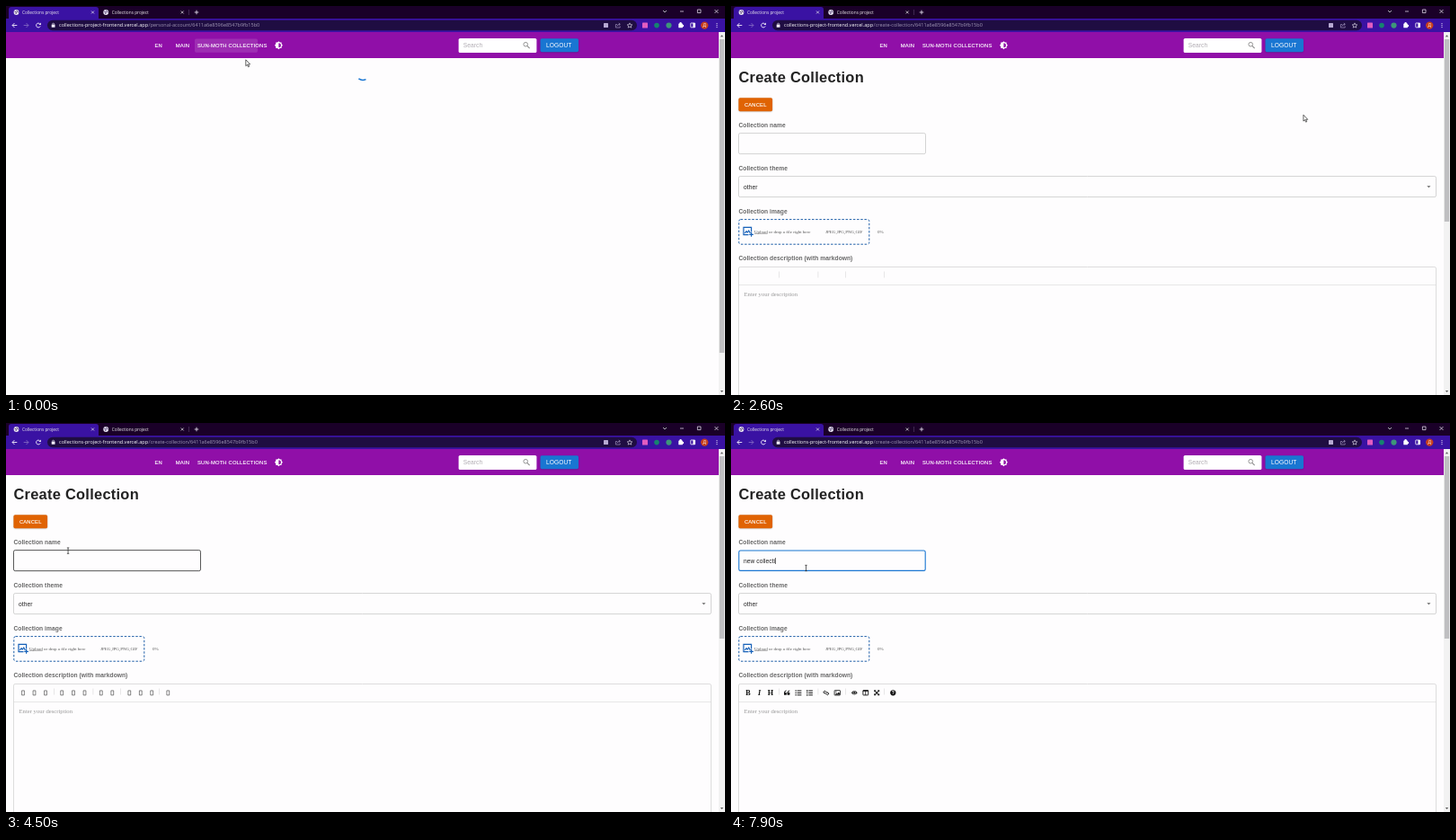
An HTML page with a canvas that plays this animation: 800 by 433 pixels, repeating every 8 s.

```html
<!DOCTYPE html>
<html lang="en">
<head>
<meta charset="utf-8">
<title>Collections project</title>
<style>
html, body { margin: 0; width: 100%; height: 100%; overflow: hidden; background: #fefdfe; }
canvas { display: block; width: 800px; height: 433px; }
</style>
</head>
<body>
<canvas id="stage"></canvas>
<script>
const LOOP = 8000, STEP = 100;
const LOADED = 400, FORM_OPEN = 2400, BOXES = 3200, ICONS = 4600, FOCUS = 4900;
const SANS = '"Liberation Sans", Arial, sans-serif';
const SERIF = '"Liberation Serif", "Times New Roman", serif';
const UI = '"Open Sans", "Noto Sans", sans-serif';
const BLUE = '#1976d2', PURPLE = '#900fa8', BAR = '#3a12a3', INK = '#222';
const USER = 'sun-moth';

// [time, tip x, tip y]
const PATH = [
  [0, 266.5, 59.5], [700, 274, 87], [900, 250, 108], [1200, 73, 131], [1300, 73, 131],
  [1800, 744, 92], [1900, 747.5, 78.2], [2400, 747.5, 78.2], [2900, 432.5, 199.5],
  [3000, 432.5, 199.5], [3600, 42.5, 106.5], [4200, 42.5, 106.5], [4700, 83.5, 161.5]
];
// [time, characters typed]
const TYPING = [[5400, 1], [5500, 2], [5700, 3], [6600, 4], [6800, 5], [6900, 6],
  [7000, 7], [7200, 9], [7600, 10], [7900, 12]];

const canvas = document.getElementById('stage');
const c = canvas.getContext('2d');
const ratio = window.devicePixelRatio || 1;
canvas.width = 800 * ratio;
canvas.height = 433 * ratio;

function box(x, y, w, h, fill, r = 0) {
  c.fillStyle = fill;
  c.beginPath();
  c.roundRect(x, y, w, h, r);
  c.fill();
}
function frame(x, y, w, h, color, width = 0.75, r = 1.7) {
  c.strokeStyle = color;
  c.lineWidth = width;
  c.beginPath();
  c.roundRect(x, y, w, h, r);
  c.stroke();
}
function disc(x, y, r, fill) {
  c.fillStyle = fill;
  c.beginPath();
  c.arc(x, y, r, 0, 7);
  c.fill();
}
function ring(x, y, r, color, width = 0.8, from = 0, to = 2 * Math.PI) {
  c.strokeStyle = color;
  c.lineWidth = width;
  c.beginPath();
  c.arc(x, y, r, from, to);
  c.stroke();
}
// SVG path data drawn with its origin at x, y
function shape(x, y, d, { fill, stroke, width = 0.8 }) {
  const path = new Path2D(d);
  c.save();
  c.translate(x, y);
  if (fill) { c.fillStyle = fill; c.fill(path); }
  if (stroke) { c.strokeStyle = stroke; c.lineWidth = width; c.stroke(path); }
  c.restore();
}
const line = (x, y, d, stroke, width) => shape(x, y, d, { stroke, width });

// y is the middle of the capitals; spacing is in em; weight thickens the strokes
function text(str, x, y, { size = 6.667, color = INK, family = SANS, style = '', spacing = 0.00938, align = 'left', weight = 0 } = {}) {
  c.font = `${style} ${size}px ${family}`;
  c.letterSpacing = spacing * size + 'px';
  c.textAlign = align;
  c.fillStyle = c.strokeStyle = color;
  c.fillText(str, x, y + size * 0.358);
  if (weight) {
    c.lineWidth = weight;
    c.strokeText(str, x, y + size * 0.358);
  }
}
function button(x, y, w, h, fill) {
  c.save();
  c.shadowColor = 'rgba(0,0,0,.25)';
  c.shadowBlur = 1.6 * ratio;
  c.shadowOffsetY = 0.6 * ratio;
  box(x, y, w, h, fill, 1.7);
  c.restore();
}
function magnifier(x, y, color) {
  ring(x, y, 2.3, color, 0.9);
  line(x, y, 'M1.7 1.7L4.4 4.4', color, 1.1);
}
const dropArrow = (x, y) => shape(x, y, 'M-2.1-1H2.1L0 1.1Z', { fill: '#666' });

function tab(x) {
  disc(x + 8.5, 7, 2.9, '#e8e4f2');
  line(x + 8.5, 7, 'M-2-1L0 0L-.6 2M.4-2.4L1 -.6L2.4 0', '#3b2560', 0.8);
  text('Collections project', x + 15, 7, { size: 4.77, color: '#eee', family: UI, spacing: 0 });
  line(x + 93.5, 7, 'M-1.5-1.5L1.5 1.5M1.5-1.5L-1.5 1.5', '#eee', 0.7);
}

function browser(formOpen) {
  const white = '#f2eefa', grey = '#b7a9d2';
  box(0, 0, 800, 14, '#1a0028');
  box(0, 14, 800, 15, BAR);
  box(3, 1, 100, 14, BAR, [3, 3, 0, 0]);
  tab(3);
  tab(102.7);
  box(203, 4, 0.5, 6, '#64517a');
  line(212, 7, 'M-2.3 0H2.3M0-2.3V2.3', white, 0.8);
  line(733, 6, 'M-2-1L0 1L2-1', white, 0.7);
  line(752, 6, 'M-2 0H2', white, 0.7);
  frame(769.4, 4, 3.6, 3.6, white, 0.7, 0);
  line(790.5, 6, 'M-2-2L2 2M2-2L-2 2', white, 0.7);

  line(9.5, 21.5, 'M2.8 0H-2.5M0-2.5L-2.5 0L0 2.5', white, 0.9);
  line(22.5, 21.5, 'M-2.8 0H2.5M0-2.5L2.5 0L0 2.5', '#8066c2', 0.9);
  ring(36, 21.5, 2.4, white, 0.9, 0.4, 5.4);
  shape(36, 21.5, 'M.4-.4H2.9V-2.9Z', { fill: white });
  box(46, 15.7, 656, 11.6, '#1f0d42', 5.8);
  box(50.7, 20.6, 3.8, 3.2, white, 0.4);
  ring(52.6, 20.4, 1.2, white, 0.6, Math.PI, 0);
  const url = { size: 5.53, family: UI, spacing: 0 };
  text('collections-project-frontend.vercel.app', 59, 21.5, { ...url, color: '#fff' });
  text((formOpen ? '/create-collection/' : '/personal-account/') + '6411a6e8596e8547b9fb15b0',
    158.6, 21.5, { ...url, color: '#a096b4' });

  box(665, 19, 5, 5, grey, 0.6);
  line(681, 21.5, 'M-1-1H-2.6V2.5H2.2V1M-1 1Q-.8-1.2 2-1.2M.8-2.6L2.4-1.2L.8 .2', grey, 0.6);
  line(694, 21.7, 'M0-2.8L.8-.9L2.8-.8L1.3 .5L1.8 2.4L0 1.4L-1.8 2.4L-1.3 .5L-2.8-.8L-.8-.9Z', white, 0.6);
  box(708, 18.6, 6, 6, '#e25cc0', 0.6);
  disc(724, 21.6, 2.8, '#16836f');
  disc(737.5, 21.6, 3.1, '#3e9679');
  box(748.3, 19.6, 4.6, 4.6, '#fff', 0.5);
  disc(750.6, 19.3, 1.2, '#fff');
  disc(753, 22, 1.2, '#fff');
  frame(761.8, 19, 4.8, 4.8, '#fff', 0.8, 0.4);
  box(764.4, 19, 2.4, 4.8, '#fff');
  disc(777.2, 21.6, 4.2, '#c8401c');
  text('Д', 777.2, 21.5, { size: 5, color: '#fff', family: UI, spacing: 0, align: 'center' });
  for (const dy of [-2, 0, 2]) disc(791, 21.6 + dy, 0.6, white);
}

function scrollbar(thumbEnd) {
  box(793, 29, 7, 404, '#f2f2f2');
  box(793.8, 37, 5.4, thumbEnd - 37, '#bfbfc1');
  shape(796.5, 33.3, 'M-1.6 .9H1.6L0-1Z', { fill: '#555' });
  shape(796.5, 429, 'M-1.6-.9H1.6L0 1Z', { fill: '#555' });
}

function header(t) {
  box(0, 29, 793, 29, PURPLE);
  if (t < 300) box(210, 36.5, 70, 15.2, `rgba(255,255,255,${0.13 * (1 - t / 300)})`, 1.7);
  const nav = { size: 5.833, color: '#fff', spacing: 0.02857, weight: 0.15 };
  text('EN', 165.5, 43.8, nav);
  text('MAIN', 188.8, 43.8, nav);
  text(USER.toUpperCase() + ' COLLECTIONS', 213, 43.8, nav);

  c.save();
  c.translate(303.4, 43.7);
  for (let i = 0; i < 2; i++) {
    box(-3.2, -3.2, 6.4, 6.4, '#fff');
    c.rotate(Math.PI / 4);
  }
  c.restore();
  shape(303.4, 43.7, 'M0-2.5A2.5 2.5 0 0 1 0 2.5Z', { fill: PURPLE });

  box(503.6, 35.9, 86.8, 16.2, '#fff', 1.7);
  text('Search', 508.8, 43.6, { color: '#b0abb2' });
  magnifier(578.2, 42.7, '#8a8a8a');
  button(594.5, 36.3, 42.5, 14.9, BLUE);
  text('LOGOUT', 601, 43.6, { color: '#fff' });
}

function spinner(t) {
  const phase = ((t + 210) % 1400) / 1400;
  const ease = u => u * u * (3 - 2 * u);
  const grow = ease(Math.min(1, phase * 2)), leave = ease(Math.max(0, phase * 2 - 1));
  const turn = 2 * Math.PI, full = 126.9;
  const offset = 15 * grow + 110 * leave;
  const start = turn * (phase + offset / full);
  const length = Math.min(1 + 99 * grow, full - offset) / full * turn;
  ring(397, 74.7, 7.7, BLUE, 1.5, start, start + length);
}

function listPage(hover) {
  text(USER + ' collections', 8.4, 76.2, { size: 12.5, style: 'bold', spacing: 0.0075 });
  button(699, 68.3, 85.7, 15.1, hover ? '#1769c1' : BLUE);
  text('CREATE COLLECTION', 705.9, 75.6, { color: '#fff' });
  frame(8.6, 96.1, 92.6, 16.2, '#c6c6c6');
  text('Search', 14, 104.3, { color: '#777' });
  frame(107.6, 96.1, 86, 16.2, '#c6c6c6');
  text('Creation (descending)', 113.3, 104.2);
  dropArrow(185.8, 104.3);
  text('No collections yet', 8.4, 131.8);
}

const TOOL_X = [19, 31.5, 44, 62.2, 75, 87.5, 105.8, 118.3, 137.3, 149.8, 162.2, 180.3];
const letter = (char, style) => x => text(char, x, 300.3, { size: 8.2, style, family: SERIF, color: '#111', spacing: 0, align: 'center' });
const list = x => {
  for (const dy of [-2.4, 0, 2.4]) {
    box(x - 1.4, 299.9 + dy, 4.8, 1, '#111');
    disc(x - 2.9, 300.4 + dy, 0.7, '#111');
  }
};
const TOOLS = [
  letter('B', 'bold'), letter('I', 'italic bold'), letter('H', 'bold'),
  x => [-1.8, 1.8].forEach(dx => {
    box(x + dx - 1.4, 300, 2.8, 2.8, '#111', 0.6);
    line(x + dx, 300, 'M-1 .8Q-1.1-2 1.2-2', '#111', 1);
  }),
  list,
  x => {
    for (const dy of [-2.4, 0, 2.4]) {
      box(x - 1.2, 299.9 + dy, 4.6, 1, '#111');
      box(x - 3.2, 299.5 + dy, 1, 1.8, '#111');
    }
  },
  x => line(x, 300.3, 'M-.6 .6L-2.3 .4A1.2 1.2 0 0 1-.6-1.6L.8 0M.6-.6L2.3 0A1.2 1.2 0 0 1 .8 2L-.5 .6', '#111', 1),
  x => {
    frame(x - 3.2, 297.6, 6.4, 5.4, '#111', 0.8, 0.5);
    shape(x, 300.4, 'M-2.6 2L-1 .2L0 1L1.4-1L2.6 .6V2Z', { fill: '#111' });
    disc(x - 1.4, 299.1, 0.7, '#111');
  },
  x => {
    shape(x, 300.3, 'M-3.4 0Q0-4.6 3.4 0Q0 4.6-3.4 0Z', { fill: '#111' });
    ring(x, 300.3, 1.5, '#fff', 0.6);
  },
  x => {
    frame(x - 2.9, 297.7, 5.8, 5.2, '#111', 0.9, 0.4);
    box(x - 0.4, 297.7, 0.8, 5.2, '#111');
    box(x - 3, 297.4, 6, 1.3, '#111');
  },
  x => {
    line(x, 300.3, 'M-2 -2L2 2M2-2L-2 2', '#111', 1.1);
    shape(x, 300.3, 'M-3-3H-.7L-3-.7ZM3-3V-.7L.7-3ZM3 3H.7L3 .7ZM-3 3V.7L-.7 3Z', { fill: '#111' });
  },
  x => {
    disc(x, 300.3, 3.1, '#111');
    text('?', x, 300.3, { size: 5, style: 'bold', color: '#fff', spacing: 0, align: 'center' });
  }
];

function nameField(t, hover) {
  const focused = t >= FOCUS;
  if (focused) frame(8.8, 142, 207.4, 22.4, BLUE, 1.1);
  else frame(8.5, 141.6, 208, 23, hover ? INK : '#c6c6c6');
  if (!focused) return;
  const last = TYPING.filter(([at]) => at <= t).pop() || [FOCUS, 0];
  const typed = 'new collecti'.slice(0, last[1]);
  text(typed, 14, 153.3);
  const caretX = 14 + c.measureText(typed).width;
  if ((t - last[0]) % 1000 < 500) box(caretX + 0.1, 150, 0.6, 7, '#111');
}

function formPage(t, over) {
  text('Create Collection', 8.4, 79.4, { size: 16.4, style: 'bold', spacing: 0.017 });
  button(8.4, 102.2, 37.7, 15, over === 'cancel' ? '#c05208' : '#e06303');
  text('CANCEL', 14.9, 109.8, { size: 5.833, color: '#fff', spacing: 0.02857, weight: 0.15 });
  [['name', 132.2], ['theme', 180.2], ['image', 228.2], ['description (with markdown)', 281]].forEach(([label, y]) =>
    text('Collection ' + label, 8.4, y, { style: 'bold', color: '#666' }));
  nameField(t, over === 'name');

  frame(8.5, 189.6, 776, 23, over === 'theme' ? '#333' : '#c6c6c6');
  text('other', 14, 201.2);
  dropArrow(776.4, 201.2);

  c.setLineDash([2.5, 1.67]);
  frame(8.8, 237.6, 145, 27.6, '#1f5fa8', 1, 2);
  c.setLineDash([]);
  line(13, 245.5, 'M6.5 9.2H1V.8H9.6V6M2.4 7.4L4.1 5.2L5.2 6.6L6.8 4.5L8.4 7.4', '#1560b8', 1.2);
  line(22.6, 254.4, 'M-2.3 0H2.3M0-2.3V2.3', '#1560b8', 1.2);
  const small = { size: 5, family: SERIF, color: '#555', spacing: 0 };
  text('Upload or drop a file right here', 26, 251.2, small);
  box(26, 253.5, 14.7, 0.4, '#555');
  text('JPEG,JPG,PNG,GIF', 105, 251.2, small);
  text('0%', 163, 251.2, small);

  frame(8.5, 290.5, 776, 160, '#d2d2d2');
  box(8.6, 310.2, 776, 0.6, '#d2d2d2');
  for (const x of [53, 96.7, 127.5, 170.5]) box(x, 295.5, 0.5, 7, '#cfcfcf');
  if (t >= ICONS) TOOLS.forEach((draw, i) => draw(TOOL_X[i]));
  else if (t >= BOXES) TOOL_X.forEach(x => frame(x - 1.4, 297.9, 2.8, 5, '#333', 0.6, 0));
  text('Enter your description', 14.5, 321, { family: SERIF, color: '#999', spacing: 0 });
}

function pointerAt(t) {
  const next = PATH.findIndex(([at]) => at > t);
  if (next < 0) return PATH[PATH.length - 1].slice(1);
  const [t0, x0, y0] = PATH[next - 1], [t1, x1, y1] = PATH[next];
  const u = (t - t0) / (t1 - t0), k = u * u * (3 - 2 * u);
  return [x0 + (x1 - x0) * k, y0 + (y1 - y0) * k];
}

function targetAt(x, y, t) {
  const inside = (l, top, r, b) => x > l && x < r && y > top && y < b;
  if (t < LOADED) return '';
  if (t < FORM_OPEN) return inside(699, 68, 785, 84) ? 'create' : '';
  if (inside(8, 102, 46, 118)) return 'cancel';
  if (inside(8, 141, 217, 165)) return 'name';
  return inside(8, 189, 785, 213) ? 'theme' : '';
}

function pointer(x, y, over) {
  if (over === 'name') {
    line(x, y, 'M-1.2-3.2H1.2M0-3.2V3.2M-1.2 3.2H1.2', '#222', 0.7);
  } else if (over) {
    shape(x, y, 'M-.8 .8Q0-.4 .8 .8V4L3.6 4.6Q4.6 4.9 4.5 6L3.8 9.8H-.8L-3 6.4Q-2.6 5-.8 6.6Z',
      { fill: '#fff', stroke: '#222', width: 0.7 });
  } else {
    shape(x, y, 'M.3 .3V7.2L1.9 5.8L3 8.3L4.1 7.8L3 5.4H5.1Z', { fill: '#fff', stroke: '#222', width: 0.7 });
  }
}

function draw(now) {
  const t = Math.floor((now % LOOP) / STEP) * STEP;
  const formOpen = t >= FORM_OPEN;
  const [x, y] = pointerAt(t);
  const over = targetAt(x, y, t);
  c.setTransform(ratio, 0, 0, ratio, 0, 0);
  box(0, 0, 800, 433, '#fefdfe');
  if (t < LOADED) spinner(t);
  else if (formOpen) formPage(t, over);
  else listPage(targetAt(...pointerAt(t - STEP), t) === 'create'); // the button darkens one step late
  header(t);
  browser(formOpen);
  scrollbar(formOpen ? 240 : 386);
  pointer(x, y, over);
}

const began = performance.now();
function tick() {
  draw(performance.now() - began);
  requestAnimationFrame(tick);
}
tick();
</script>
</body>
</html>
```
